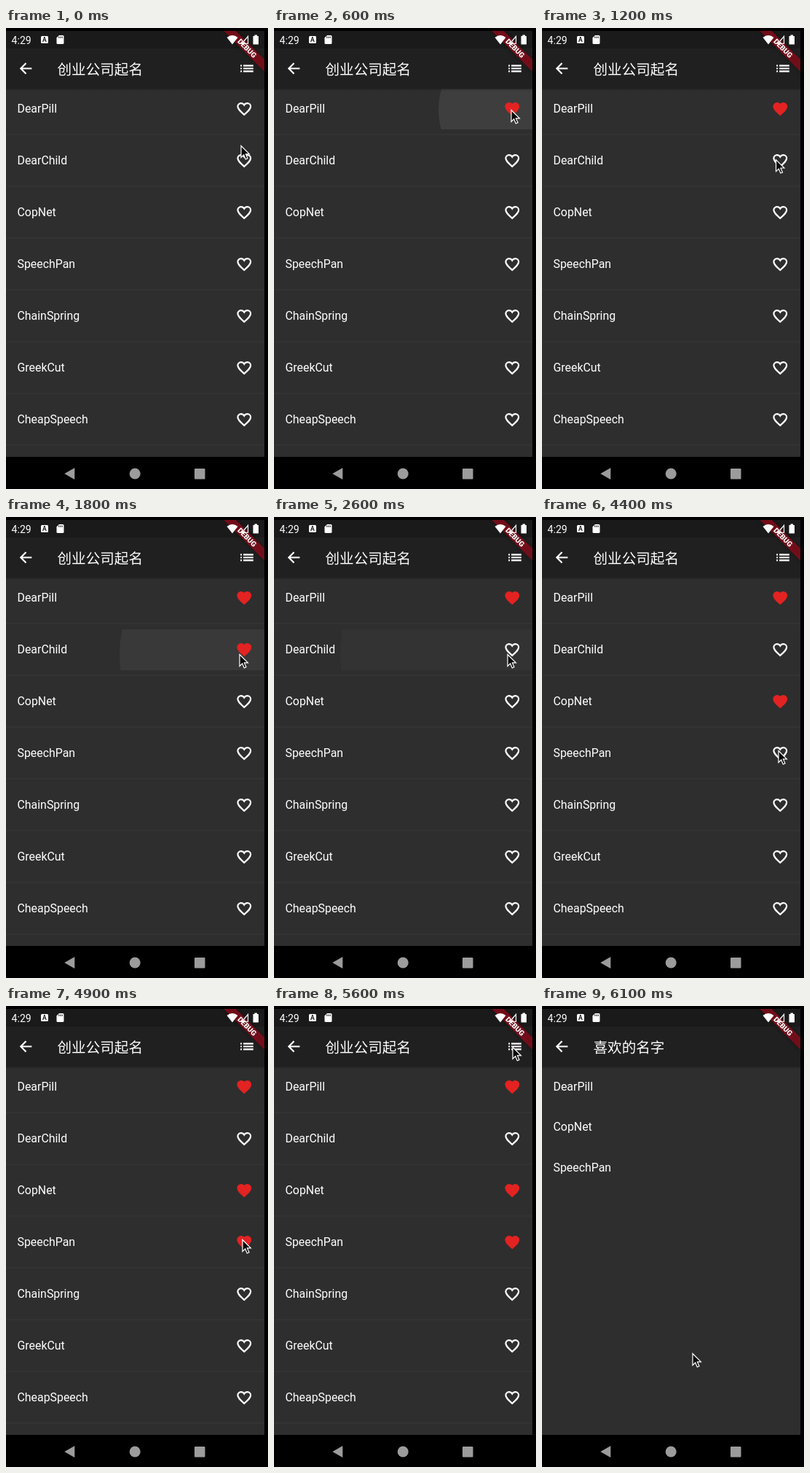
Recreate the animation shown at these times as an HTML page with a canvas. Size 360 by 632 pixels, loop 6.3 s.

```html
<!DOCTYPE html>
<html lang="zh">
<head>
<meta charset="utf-8">
<title>Name list</title>
<style>
html, body { margin: 0; height: 100%; overflow: hidden; background: #000; }
canvas { display: block; }
</style>
</head>
<body>
<canvas id="stage" width="360" height="632"></canvas>
<script>
const ctx = document.getElementById('stage').getContext('2d');
const LOOP = 6300, STEP = 100, GLIDE = 500, RIPPLE = 400;
const W = 355, TOP = 4, BOTTOM = 588, SCALE = 0.986;
const BACK = '#2e2e2e', WHITE = '#fff', RED = '#e32322';
const LATIN = 'Roboto, sans-serif', HAN = '"Noto Sans CJK SC", "Noto Sans CJK", sans-serif';
const names = ['DearPill', 'DearChild', 'CopNet', 'SpeechPan', 'ChainSpring', 'GreekCut', 'CheapSpeech'];
const rowY = i => 110.5 + 71 * i;

// Where the pointer arrives, when, and which row it presses there
const stops = [
  { at: 0, x: 323, y: 161 },
  { at: 500, x: 326, y: 112, row: 0, taps: [500] },
  { at: 1300, x: 321, y: 188, row: 1, taps: [1600, 2300] },
  { at: 3200, x: 329, y: 252, row: 2, taps: [3500] },
  { at: 4200, x: 325, y: 320, row: 3, taps: [4500] },
  { at: 5500, x: 328, y: 56 },
  { at: 6100, x: 207, y: 476 }
];

// Icons are outlines on a 24 unit grid
const icon = {
  back: new Path2D('M20 12H5M12 4.7L4.7 12l7.3 7.3'),
  list: new Path2D('M3 8h2m2 0h14M3 12h2m2 0h14M3 16h2m2 0h14'),
  heart: new Path2D('M12 20C5.5 14.2 3 11.6 3 8.5 3 6 5 4 7.5 4c1.8 0 3.6 1 4.5 2.5C12.9 5 14.7 4 16.5 4 19 4 21 6 21 8.5c0 3.1-2.5 5.7-9 11.5z')
};
const pointerShape = new Path2D('M0 0v16l3.7-3.6 2.6 6 2.7-1.1-2.6-5.9h5z');

const clamp = p => Math.max(0, Math.min(1, p));
const smooth = p => p * p * (3 - 2 * p);

function rect(color, x, y, w, h, r = 0) {
  ctx.fillStyle = color;
  ctx.beginPath();
  ctx.roundRect(x, y, w, h, r);
  ctx.fill();
}

function disc(color, x, y, r) {
  rect(color, x - r, y - r, 2 * r, 2 * r, r);
}

function clip(y, h) {
  ctx.beginPath();
  ctx.rect(0, y, W, h);
  ctx.clip();
}

function text(str, x, y, font, color = WHITE) {
  ctx.font = font;
  ctx.fillStyle = color;
  ctx.fillText(str, x, y);
}

function drawIcon(path, x, y, color = WHITE, filled = false) {
  ctx.save();
  ctx.translate(x, y);
  ctx.scale(SCALE, SCALE);
  ctx.translate(-12, -12);
  ctx.strokeStyle = ctx.fillStyle = color;
  ctx.lineWidth = 2.2;
  ctx.stroke(path);
  if (filled) ctx.fill(path);
  ctx.restore();
}

function label(str, y) {
  text(str, 15.5, y + 5.5, '15.9px ' + LATIN);
}

function bar(title) {
  const shade = ctx.createLinearGradient(0, 83, 0, 87);
  shade.addColorStop(0, 'rgba(0,0,0,.2)');
  shade.addColorStop(1, 'rgba(0,0,0,0)');
  rect(shade, 0, 83, W, 4);
  rect('#202020', 0, TOP, W, 79.5);
  rect('#1a1a1a', 0, TOP, W, 24);
  drawIcon(icon.back, 27.5, 55.5);
  text(title, 70.5, 63.5, '19.6px ' + HAN);
}

function drawRipple({ x, y, row }, age) {
  if (age < 0 || age >= RIPPLE) return;
  ctx.save();
  clip(rowY(row) - 27.5, 56);
  disc(`rgba(255,255,255,${.1 * (1 - age / RIPPLE)})`, x, y, 35 + .65 * age);
  ctx.restore();
}

function mainPage(t) {
  rect(BACK, 0, TOP, W, BOTTOM - TOP);
  names.forEach((name, i) => {
    const y = rowY(i);
    const stop = stops.find(s => s.row === i);
    const taps = stop ? stop.taps : [];
    const liked = taps.filter(tap => t > tap).length % 2 === 1;
    taps.forEach(tap => drawRipple(stop, t - tap));
    rect('#393939', 0, y + 35, W, 1);
    label(name, y);
    drawIcon(icon.heart, 327.3, y + .5, liked ? RED : WHITE, liked);
  });
  bar('创业公司起名');
  drawIcon(icon.list, 331, 55.5);
}

// The second page fades in while it slides up
function savedPage(t) {
  const p = clamp((t - 5600) / 400);
  if (!p) return;
  ctx.save();
  clip(TOP, BOTTOM - TOP);
  ctx.globalAlpha = p;
  ctx.translate(0, 150 * (1 - p) ** 3);
  rect(BACK, 0, TOP, W, BOTTOM - TOP);
  [0, 2, 3].forEach((n, i) => label(names[n], 110.5 + 55.3 * i));
  bar('喜欢的名字');
  ctx.restore();
}

function banner() {
  ctx.save();
  clip(TOP, BOTTOM);
  ctx.translate(W, TOP);
  ctx.rotate(Math.PI / 4);
  ctx.shadowColor = 'rgba(0,0,0,.5)';
  ctx.shadowBlur = 6;
  rect('rgba(140,12,28,.78)', -40, 27.6, 80, 11.8);
  ctx.shadowColor = 'transparent';
  ctx.textAlign = 'center';
  text('DEBUG', 0, 37.1, '900 10px ' + LATIN);
  ctx.restore();
}

function statusBar() {
  text('4:29', 7.6, 21.5, '14.1px ' + LATIN);
  rect(WHITE, 48, 11, 10, 10, 1.5);
  text('A', 50, 19, 'bold 8.5px ' + LATIN, '#1a1a1a');

  ctx.fillStyle = ctx.strokeStyle = WHITE;
  ctx.fill(new Path2D('M73 10h5q1.5 0 1.5 1.5v9q0 1.5-1.5 1.5h-7q-1.5 0-1.5-1.5v-7z'));
  ctx.fill(new Path2D('M303.5 13q7.5-6 15 0l-7.5 9.5z'));
  ctx.lineWidth = 1.2;
  ctx.stroke(new Path2D('M324 21.5h8.5V11.5z'));
  for (let i = 0; i < 3; i++) rect('#1a1a1a', 72.3 + 2.2 * i, 11.5, 1, 2.5);
  rect(WHITE, 341.5, 9.5, 3.5, 3);
  rect(WHITE, 339.5, 11, 7.5, 11.5, .5);
}

function navBar() {
  const grey = '#9c9c9c';
  rect('#000', 0, BOTTOM, 360, 44);
  disc(grey, 177.2, 611, 7.5);
  rect(grey, 259, 604, 14.5, 14.5, 1);
  ctx.fill(new Path2D('M80.3 611l14-8v16z'));
}

// The pointer rests at each stop and glides to the next just before it is due
function drawPointer(t) {
  let { x, y } = stops[0];
  for (const stop of stops.slice(1)) {
    const p = smooth(clamp((t - stop.at) / GLIDE + 1));
    x += (stop.x - x) * p;
    y += (stop.y - y) * p;
  }
  ctx.save();
  ctx.translate(x, y + .5);
  ctx.fillStyle = '#080808';
  ctx.strokeStyle = WHITE;
  ctx.lineWidth = 1.2;
  ctx.fill(pointerShape);
  ctx.stroke(pointerShape);
  ctx.restore();
}

function frame(now) {
  const t = Math.floor(now % LOOP / STEP) * STEP;
  rect('#000', 0, 0, 360, 632);
  mainPage(t);
  savedPage(t);
  banner();
  statusBar();
  navBar();
  drawPointer(t);
  requestAnimationFrame(frame);
}
requestAnimationFrame(frame);
</script>
</body>
</html>
```
